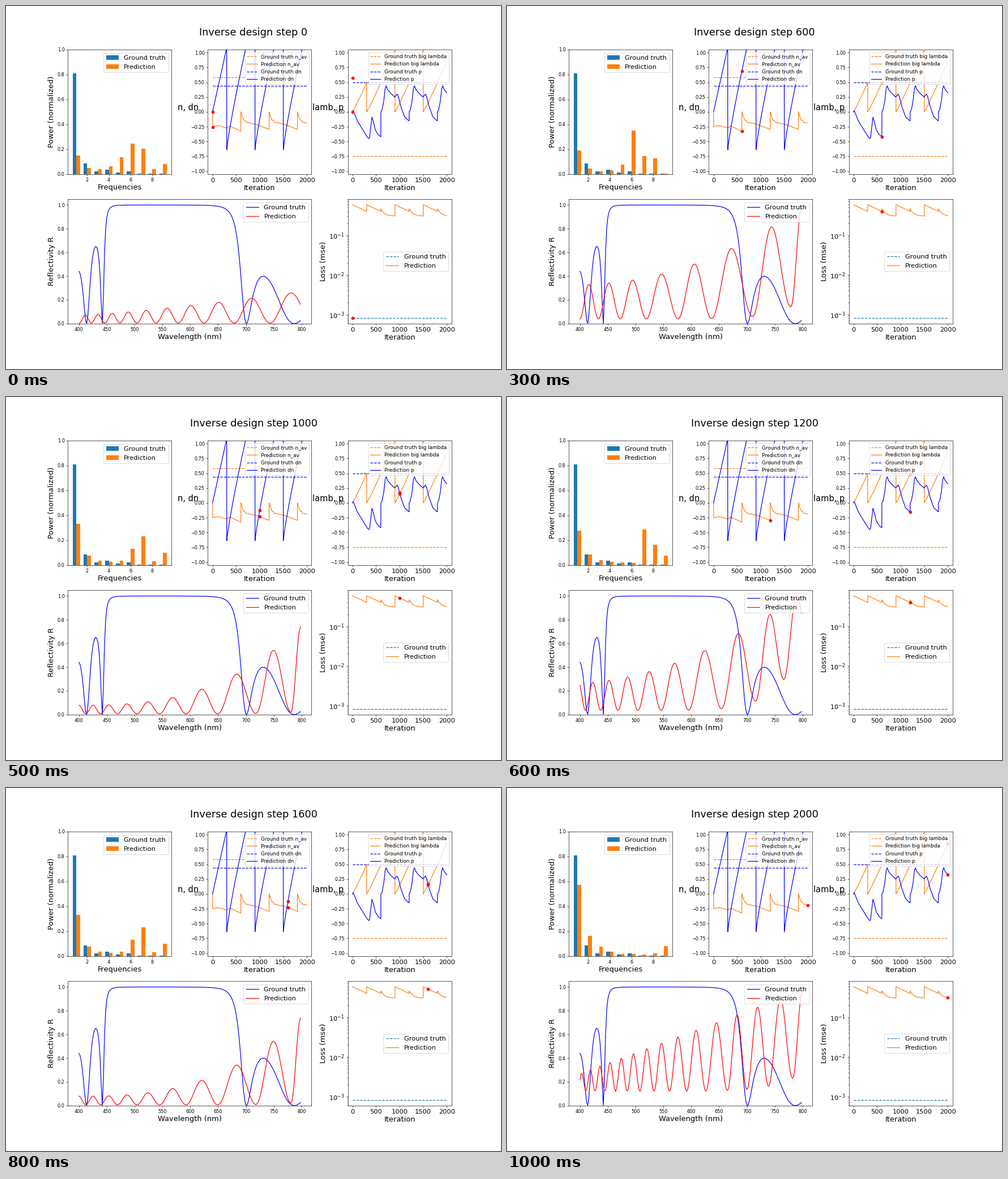
A matplotlib script that plays this animation: 874x641 px, repeating every 1.1 s.

```python
import matplotlib.pyplot as plt
import numpy as np
from matplotlib.animation import FuncAnimation

WIDTH, HEIGHT, DPI = 874, 641, 58.25
ORANGE, BLUE = "tab:orange", "b"
STEP, CYCLE, STEPS = 200, 600, 2000

wl = np.arange(400, 800, 2)
freqs = np.arange(1, 10)
its = np.arange(STEPS + 1)


def stop_band(lam):
    """Bragg mirror reflectivity from coupled-mode theory."""
    d = 1 / lam - 0.0018445
    s2 = (13853 * d) ** 2 - 23.64
    s = np.sqrt(np.abs(s2)) + 1e-9
    f = np.where(s2 > 0, np.sin(s), np.sinh(s)) ** 2 / s**2
    k = 23.64 * np.exp(0.53 * d / 0.000489)
    return k * f / (1 + k * f)


def fringes(at, count, base, rise, power, floor, lift=0):
    """Interference fringes, evenly spaced in 1/wavelength between knots."""
    t = (wl - 400) / 398
    top = np.minimum(base + rise * t**power, 1.02)
    low = floor + lift * t**8
    turns = np.interp(-1 / wl, -1 / np.array(at), count)
    return low + (top - low) * np.sin(np.pi * turns) ** 2


def power_spectrum(r):
    power = np.abs(np.fft.rfft(r))[freqs] ** 2
    return power / power.sum()


def since(first, period=CYCLE):
    """Iterations since the last restart; restarts begin after `first`."""
    return np.where(its <= first, its, (its - first - 1) % period)


def corners(x, *points):
    return np.interp(x, *np.array(points).T)


# Predicted reflectivity at the distinct stages of the optimisation
initial = fringes([400, 798], [-.04, 9.72], .07, .2, 1.3, .004)
early = fringes([400, 531.5, 643.5, 699.5, 716, 798], [-.35, 3, 5, 6, 6.5, 6.5],
                .31, 1.02, 1.7, .015, 2)
middle = fringes([400, 576.5, 710.5, 779.5, 798], [0, 4, 6, 7, 7.5],
                 .33, .65, 2, .04, .15)
restart = fringes([400, 718, 781, 798], [-.5, 7, 8, 8.5], .08, .66, 2.7, .006, .02)
dense = fringes([400, 665, 782.5, 798], [-.7, 10, 13, 13.45], .27, .7, 1, .12, .15)
late = fringes([400, 654.5, 716, 767.5, 798], [-.4, 6, 7, 8, 8.7],
               .27, .76, 1.8, .035, .5)
spectra = [initial, early, restart, middle, dense, restart,
           late, dense, restart, late, dense]

# Parameter histories: each restarts every 600 iterations
s = since(300)
dn = np.where(its <= 300, .0036 * its, .52 * (s / 100) ** .855 - .64)
lamb = .15 * (s / 100) ** 1.08

s = since(CYCLE)
n_av = np.where(
    its <= CYCLE,
    corners(s, (0, 0), (3, -.25), (110, -.23), (300, -.272), (365, -.24), (600, -.325)),
    corners(s, (0, 0), (25, -.07), (60, -.14), (80, -.14), (110, -.175),
            (300, -.205), (600, -.295)))
p = np.where(
    its <= CYCLE,
    corners(s, (0, 0), (15, .02), (100, -.15), (300, -.41), (340, -.45), (360, -.44),
            (412, -.09), (450, -.19), (480, -.3), (540, -.38), (600, -.42)),
    corners(s, (0, 0), (25, .03), (60, .17), (90, .39), (112, .44), (140, .38),
            (200, .32), (295, .25), (345, .3), (370, .26), (420, .1),
            (500, -.08), (590, -.15)))

s = since(300, 300)
half = np.maximum(its - 1, 0) // 300
loss = np.where((half == 0) | (half % 2 == 1),
                .6 * np.exp(-.0013 * s), .31 + .16 * np.exp(-s / 70))


def history(ax, y, start, truth, color, name="", truth_color=None):
    """Dashed target, solid prediction and a red dot that follows it."""
    ax.plot([0, STEPS], [truth] * 2, "--", color=truth_color or color,
            label="Ground truth" + name)
    ax.plot(its, y, color=color, label="Prediction" + name)
    values = y[::STEP].copy()
    values[0] = start
    return ax.plot([0], [start], "ro", zorder=3)[0], values


fig = plt.figure(figsize=((WIDTH + .01) / DPI, (HEIGHT + .01) / DPI),
                 dpi=DPI, facecolor="white")
grid = fig.add_gridspec(2, 3, left=.125, right=.9, top=.88, bottom=.125,
                        wspace=.35, hspace=.2)
title = fig.suptitle("", fontsize=22, y=.94)

ax_pow = fig.add_subplot(grid[0, 0])
ax_n = fig.add_subplot(grid[0, 1])
ax_lam = fig.add_subplot(grid[0, 2])
ax_ref = fig.add_subplot(grid[1, :2])
ax_loss = fig.add_subplot(grid[1, 2])

mirror = stop_band(wl)
ax_pow.bar(freqs - .175, power_spectrum(mirror), .35, label="Ground truth")
bars = ax_pow.bar(freqs + .175, power_spectrum(initial), .35, label="Prediction")
ax_pow.set(xlim=(.215, 9.785), ylim=(0, 1), xticks=[2, 4, 6, 8])
ax_pow.set_ylabel("Power (normalized)", fontsize=16)
ax_pow.legend(loc="upper right", fontsize=14)

dots = [
    history(ax_n, n_av, -.255, .585, ORANGE, " n_av"),
    history(ax_n, dn, 0, .44, BLUE, " dn"),
    history(ax_lam, lamb, .57, -.75, ORANGE, " big lambda"),
    history(ax_lam, p, 0, .5, BLUE, " p"),
    history(ax_loss, loss, 8.2e-4, 8.2e-4, ORANGE, truth_color="tab:blue"),
]

for ax, label in ((ax_n, "n, dn"), (ax_lam, "lamb, p")):
    ax.set_ylim(-1.05, 1.05)
    ax.set_ylabel(label, fontsize=18, rotation=0, labelpad=6)
    ax.legend(loc="upper right", fontsize=11)

ax_loss.set_yscale("log")
ax_loss.set_ylim(5.9e-4, .835)
ax_loss.set_ylabel("Loss (mse)", fontsize=16)
ax_loss.tick_params(axis="y", labelsize=14)
ax_loss.legend(loc="center right", fontsize=14)

ax_ref.plot(wl, mirror, BLUE, label="Ground truth")
curve, = ax_ref.plot(wl, initial, "r", label="Prediction")
ax_ref.set(xlim=(380.1, 817.9), ylim=(0, 1.05))
ax_ref.set_ylabel("Reflectivity R", fontsize=16)
ax_ref.legend(loc="upper right", fontsize=14)

for ax in (ax_n, ax_lam, ax_loss):
    ax.set(xlim=(-100, 2100), xticks=range(0, STEPS + 1, 500))
    ax.tick_params(axis="x", labelsize=14)

for ax, label in ((ax_pow, "Frequencies"), (ax_ref, "Wavelength (nm)"),
                  (ax_n, "Iteration"), (ax_lam, "Iteration"), (ax_loss, "Iteration")):
    ax.set_xlabel(label, fontsize=16, labelpad=3)


def draw(i):
    title.set_text(f"Inverse design step {i * STEP}")
    for bar, power in zip(bars, power_spectrum(spectra[i])):
        bar.set_height(power)
    curve.set_ydata(spectra[i])
    for dot, values in dots:
        dot.set_data([i * STEP], [values[i]])
    return [title, curve, *bars, *(dot for dot, _ in dots)]


anim = FuncAnimation(fig, draw, frames=len(spectra), interval=100, repeat=True)
plt.show()
```
